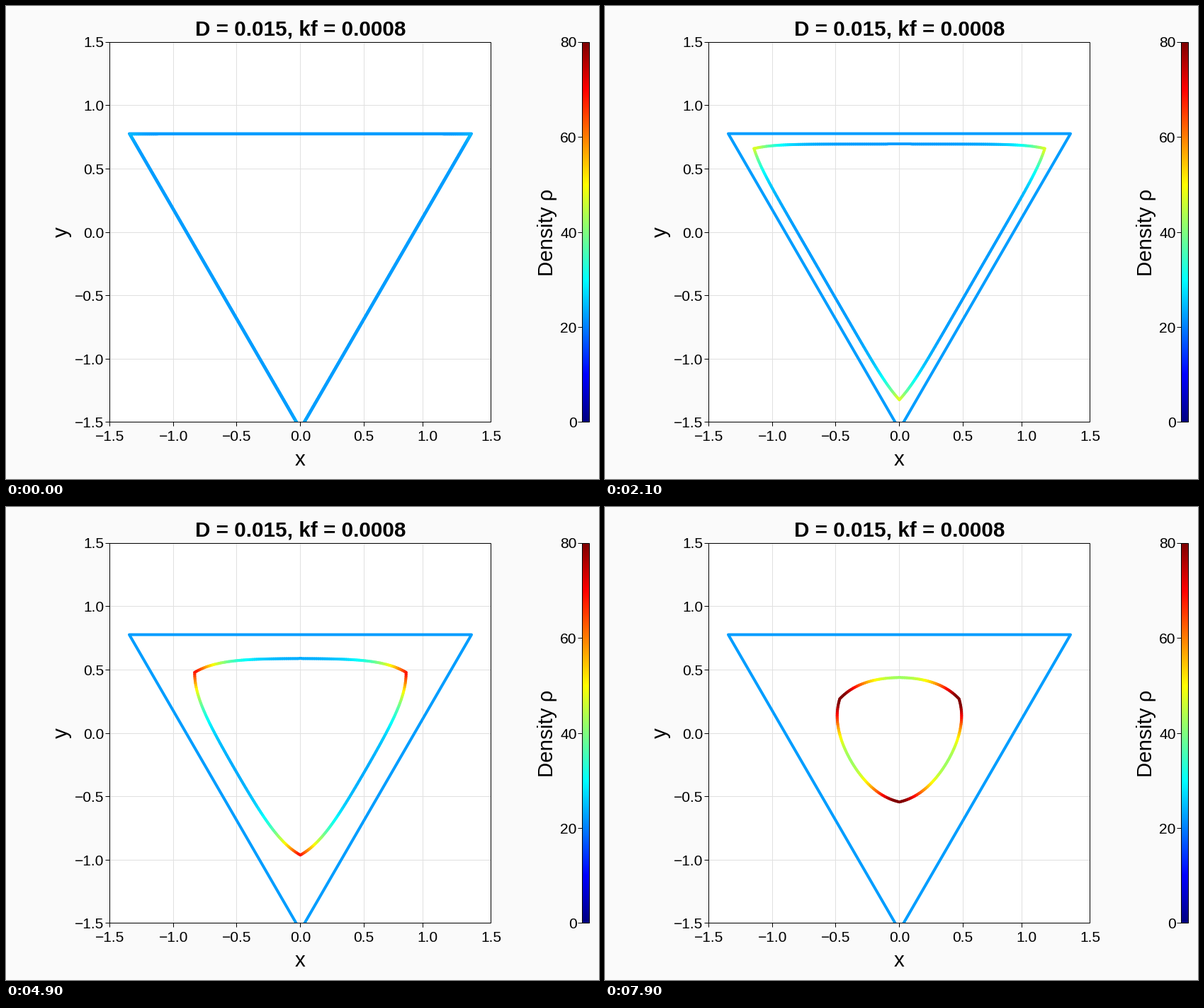
Write a matplotlib script that moves like this. It is 837 px wide and 669 px high and loops after 8 s.

```python
import numpy as np
import matplotlib.pyplot as plt
from matplotlib.animation import FuncAnimation
from matplotlib.collections import LineCollection
from matplotlib.colors import LinearSegmentedColormap
from matplotlib.patches import Rectangle

W, H, DPI = 837, 669, 64
PT = 72 / DPI                       # points per pixel
LEFT, RIGHT, TOP, BOTTOM = 146.5, 684.5, 51, 589
CX, CY, UNIT = (LEFT + RIGHT) / 2, (TOP + BOTTOM) / 2, (RIGHT - LEFT) / 3
BAR_L, BAR_R = 813.5, 823.5

FRAMES, INTERVAL = 80, 100
CELLS, D, KF = 180, 0.015, 0.0008
DT, SUBSTEPS = 0.21, 80
RHO_MAX = 80

JET = LinearSegmentedColormap.from_list("jet_linear", [
    (0, (0, 0, 0.5)), (0.125, (0, 0, 1)), (0.375, (0, 1, 1)),
    (0.625, (1, 1, 0)), (0.875, (1, 0, 0)), (1, (0.5, 0, 0))], N=1024)


def triangle():
    """Closed chain of cells on a triangle of area pi, as complex numbers."""
    radius = np.sqrt(4 * np.pi / (3 * np.sqrt(3)))
    corners = radius * np.exp(1j * np.radians([-90, 30, 150]))
    f = np.arange(CELLS // 3) / (CELLS // 3)
    return np.concatenate([a + (b - a) * f
                           for a, b in zip(corners, np.roll(corners, -1))])


def step(z, dt):
    """Inward growth at speed KF * rho, with diffusion along the curve."""
    edge = np.roll(z, -1) - z
    size = np.abs(edge)
    tau = edge / size
    size_p, tau_p = np.roll(size, 1), np.roll(tau, 1)
    rho, rho_p = 1 / size, 1 / size_p
    both = tau + tau_p
    length = np.abs(both)
    mean = (rho + rho_p) / 2
    normal = KF * mean / (length / 2)
    slide = D * (rho_p - rho) / (mean * (size + size_p) / 2)
    return z + dt * (slide + 1j * normal) * both / length


def simulate():
    z, shapes = triangle(), []
    for _ in range(FRAMES):
        for _ in range(SUBSTEPS):
            z = step(z, DT / SUBSTEPS)
        shapes.append(z)
    return shapes


def to_px(z):
    return np.column_stack([CX + z.real * UNIT, CY - z.imag * UNIT])


def pieces(z):
    """Short segments of even length, with the density at their middles."""
    loop = np.append(z, z[0])
    size = np.abs(np.diff(loop))
    rho = 1 / size
    node = (rho + np.roll(rho, 1)) / 2
    node = np.append(node, node[0])
    s = np.append(0, np.cumsum(size))
    n = 3 * int(s[-1] * UNIT / 9)
    cuts = np.linspace(0, s[-1], n + 1)
    p = to_px(np.interp(cuts, s, loop))
    mids = (cuts[1:] + cuts[:-1]) / 2
    return np.stack([p[:-1], p[1:]], axis=1), np.interp(mids, s, node)


fig = plt.figure(figsize=(W / DPI, H / DPI), dpi=DPI, facecolor="#fafafa")
ax = fig.add_axes([0, 0, 1, 1])
ax.axis("off")


def rule(x, y, color="black", z=5):
    ax.plot(x, y, color=color, lw=PT, solid_capstyle="butt", snap=False, zorder=z)


def label(x, y, text, size, ha="center", **kw):
    ax.text(x, y, text, fontsize=size * PT, family="Liberation Sans", ha=ha,
            va="baseline", rotation_mode="anchor", **kw)


def frame(l, r):
    t, b = TOP + 0.5, BOTTOM - 0.5
    ax.plot([l, r, r, l, l], [t, t, b, b, t], color="black", lw=PT,
            solid_joinstyle="miter", snap=False, zorder=5)


def crisp(v):
    return min(np.floor(v + 1e-6), BOTTOM - 1) + 0.5


panel = Rectangle((LEFT, TOP), RIGHT - LEFT, BOTTOM - TOP, fc="white", ec="none", zorder=0)
ax.add_patch(panel)

for v in np.arange(-3, 4) / 2:
    x, y = crisp(CX + v * UNIT), crisp(CY - v * UNIT)
    name = f"{v:.1f}".replace("-", "\u2212")
    if abs(v) < 1.5:
        rule([x, x], [TOP, BOTTOM], "#e0e0e0", 1)
        rule([LEFT, RIGHT], [y, y], "#e0e0e0", 1)
    rule([x, x], [BOTTOM, BOTTOM + 5.5])
    rule([LEFT - 6, LEFT], [y, y])
    label(CX + v * UNIT, 615.3, name, 21)
    label(138.6, CY - v * UNIT + 7.5, name, 21, "right")
frame(LEFT, RIGHT)

ax.imshow(np.linspace(1, 0, 538)[:, None], cmap=JET, vmin=0, vmax=1, aspect="auto",
          extent=(BAR_L, BAR_R, BOTTOM, TOP), zorder=2)
for v in range(0, RHO_MAX + 1, 20):
    y = BOTTOM - v / RHO_MAX * (BOTTOM - TOP)
    rule([BAR_L - 6, BAR_L], [crisp(y)] * 2)
    label(805.6, y + 7.5, str(v), 21, "right")
frame(BAR_L, BAR_R)

label(CX + 0.5, 41.2, "D = 0.015, kf = 0.0008", 29.6, weight="bold")
label(CX, 650, "x", 29.5)
label(86.7, CY, "y", 29.5, rotation=90)
label(772.5, CY + 0.5, "Density ρ", 29.5, rotation=90)

start = triangle()
rho0 = 1 / abs(start[1] - start[0])
outer, = ax.plot(*to_px(np.append(start, start[0])).T, color=JET(rho0 / RHO_MAX),
                 lw=4 * PT, solid_joinstyle="round", solid_capstyle="round", zorder=3)
front = LineCollection([], cmap=JET, linewidths=4 * PT, capstyle="round", zorder=4)
front.set_clim(0, RHO_MAX)
ax.add_collection(front, autolim=False)
for artist in (outer, front):
    artist.set_clip_path(panel)

ax.set_xlim(0, W)
ax.set_ylim(H, 0)

shapes = simulate()


def draw(i):
    segments, rho = pieces(shapes[i])
    front.set_segments(segments)
    front.set_array(rho)
    return front,


anim = FuncAnimation(fig, draw, frames=FRAMES, interval=INTERVAL, repeat=True,
                     repeat_delay=0, cache_frame_data=False)
plt.show()
```
